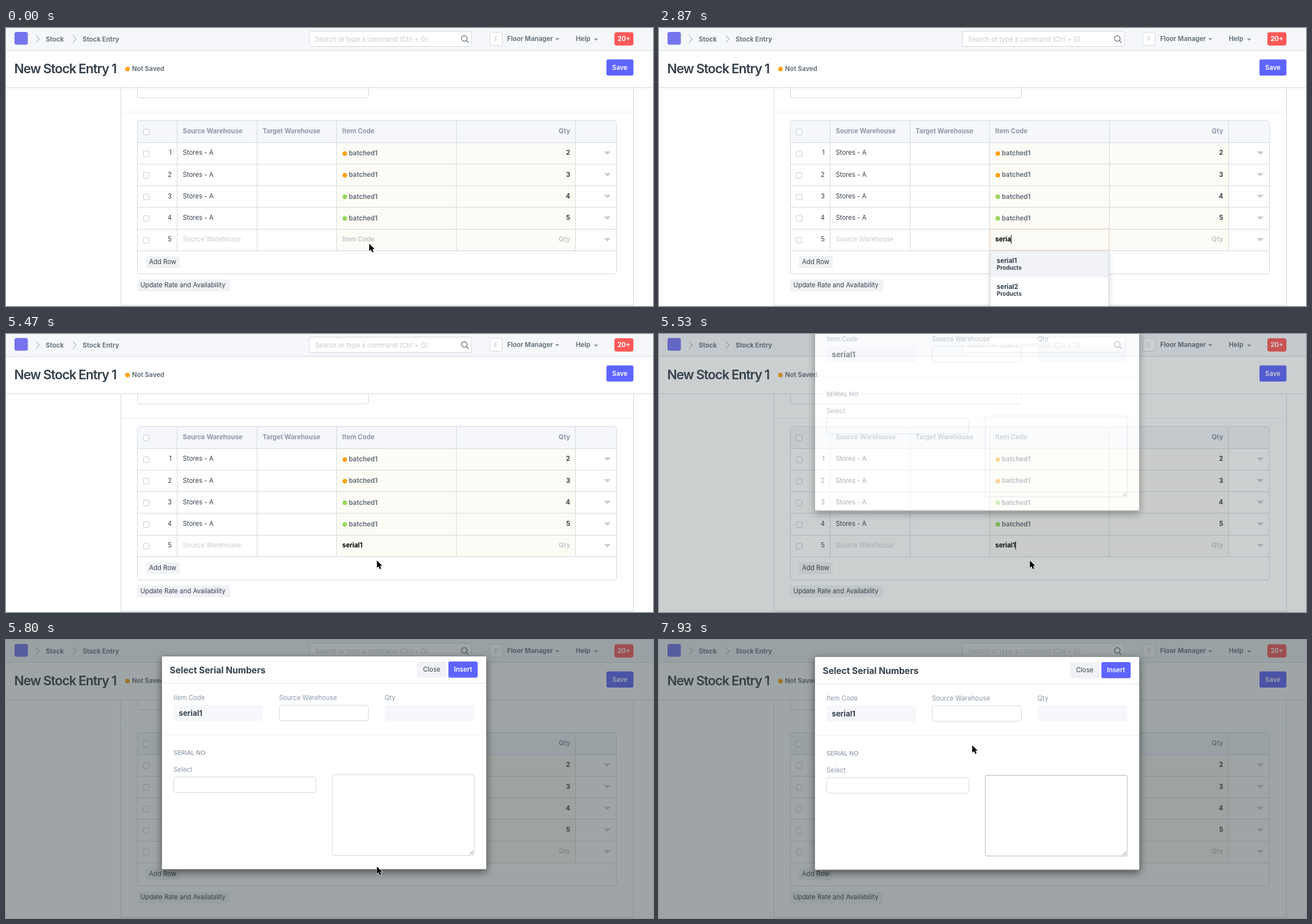
An HTML page for the animation above (8 s loop, 1140x491 px).

```html
<!DOCTYPE html>
<html lang="en">
<head>
<meta charset="utf-8">
<title>Stock entry</title>
<style>
  html, body { margin: 0; width: 100%; height: 100%; overflow: hidden; background: #fff; }
  svg { display: block; }
  text { font: 400 11.4px Inter, "Open Sans", sans-serif; font-optical-sizing: none; fill: #36414c; white-space: pre; }
  .b { font-weight: 700; }
  .m { font-weight: 600; }
  .end { text-anchor: end; }
  .mid { text-anchor: middle; }
  .grey { fill: #8d99a6; }
  .nav { fill: #6c7680; }
  .hint { fill: #c6cacf; }
  .white { fill: #fff; }
  .ink { fill: #000; }
  .small { font-size: 10px; }
  .h1 { font-size: 22.8px; font-weight: 600; letter-spacing: -1.06px; }
  .h4 { font-size: 15.6px; font-weight: 700; }
  .field { font-size: 13.3px; font-weight: 700; }
  .caps { font-size: 10.8px; font-weight: 500; }
  .drop { filter: drop-shadow(0 3px 4px rgba(0,0,0,.18)); }
  .lift { filter: drop-shadow(0 5px 7px rgba(0,0,0,.5)); }
</style>
</head>
<body>
<svg id="stage" width="1140" height="491" viewBox="0 0 1140 491"></svg>
<script>
const LOOP = 8000, STEP = 1000 / 15;
const LINE = '#d1d8dd', FAINT = '#ebeff2', PALE = '#f5f7fb', BUTTON = '#f0f2f6', BLUE = '#5e64ff';
const ORANGE = '#ffa00a', GREEN = '#98d85b';
const ROW = 38.2, TOP = 202.3;
const COLS = [301.5, 442.5, 582.5, 793.5, 1003.5];

const text = (x, y, s, cls = '', id = '') => `<text x="${x}" y="${y}" class="${cls}" id="${id}">${s}</text>`;
const box = (x, y, w, h, fill, stroke = 'none', r = 0, extra = '') =>
  `<rect x="${x}" y="${y}" width="${w}" height="${h}" rx="${r}" fill="${fill}" stroke="${stroke}" ${extra}/>`;
const path = (d, stroke, fill = 'none', w = 1, extra = '') =>
  `<path d="${d}" stroke="${stroke}" fill="${fill}" stroke-width="${w}" ${extra}/>`;
const dot = (x, y, fill) => `<circle cx="${x}" cy="${y}" r="4" fill="${fill}"/>`;
const caretDown = (x, y, w, h, fill) => path(`M${x} ${y}h${w}l${-w / 2} ${h}z`, 'none', fill);
const checkbox = y => box(242, y - 5, 10, 10, '#fff', '#c3c9cf', 1.5);

function gridRow(i) {
  const y = TOP + ROW * i, base = y + 22, last = i === 4;
  return (i === 3 ? box(232, y, 843, ROW, PALE, 'none', 0, 'id="hover"') : '')
    + box(582.5, y, 421, ROW, '#fcfbf5')
    + checkbox(y + 19.7)
    + text(292, base, i + 1, 'end')
    + (last
      ? text(311.5, base, 'Source Warehouse', 'hint') + text(994, base, 'Qty', 'b hint end')
      : text(311.5, base, 'Stores - A')
        + dot(597, y + 19.4, i < 2 ? ORANGE : GREEN)
        + text(604, base + .9, 'batched1', 'b nav')
        + text(994, base, i + 2, 'b end'))
    + caretDown(1053.5, y + 15.8, 12, 6, '#c9cccf');
}

function grid() {
  const bottom = TOP + ROW * 5;
  let lines = '';
  for (let i = 0; i < 6; i++) lines += `M232 ${Math.floor(TOP + ROW * i) + .5}H1075`;
  for (const x of COLS) lines += `M${x} 164V${bottom}`;
  return box(231.5, 163.5, 844, 271, '#fff', LINE, 4)
    + box(232, 164, 843, 38.5, PALE, 'none', 3.5)
    + checkbox(183.5)
    + text(311.5, 186.2, 'Source Warehouse', 'b grey')
    + text(452, 186.2, 'Target Warehouse', 'b grey')
    + text(592.5, 186.2, 'Item Code', 'b grey')
    + text(994, 186.2, 'Qty', 'b grey end')
    + [0, 1, 2, 3, 4].map(gridRow).join('')
    + path(lines, LINE)
    + box(247, 403, 59, 21, BUTTON, 'none', 2) + text(252, 417.4, 'Add Row');
}

const page = () =>
  path('M202.5 106V491M1105.5 106V491M202 489.5H1106', LINE)
  + path('M203 148.5H1105', FAINT)
  + box(231.5, 90, 407, 33.5, '#fff', LINE, 4)
  + grid()
  + box(231.5, 444, 163.5, 21, BUTTON, 'none', 2)
  + text(236.7, 458.4, 'Update Rate and Availability')
  + box(0, 40, 1140, 65, '#fff') + path('M0 105.5H1140', LINE)
  + text(14.5, 80.2, 'New Stock Entry 1', 'h1')
  + dot(214, 72.4, ORANGE) + text(222, 76.4, 'Not Saved', 'b nav')
  + box(1058, 55.5, 47.5, 28.5, BLUE, 'none', 3) + text(1081.5, 73.6, 'Save', 'm white mid');

const navbar = () =>
  box(0, 0, 1140, 39, PALE) + path('M0 39.5H1140', LINE)
  + box(15, 7, 23.5, 22.5, '#7574ee', 'none', 3.5)
  + path('M53 13l5.5 6.5-5.5 6.5M118 13l5.5 6.5-5.5 6.5', '#b8c0c8', 'none', 1.3)
  + text(70, 23.7, 'Stock', 'b nav') + text(135, 23.7, 'Stock Entry', 'b nav')
  + box(534.5, 5.5, 286, 27, '#fff', LINE, 2)
  + text(544.5, 23.7, 'Search or type a command (Ctrl + G)', 'hint')
  + path('M812.5 18.5a5 5 0 1 1-10 0a5 5 0 1 1 10 0M811 22l4.3 4.3', '#6c7680', 'none', 1.3)
  + box(852.5, 7.5, 22, 23, '#fff', LINE, 3) + text(863.5, 23.7, 'F', 'hint mid')
  + text(883, 23, 'Floor Manager', 'b nav') + caretDown(967.5, 18, 7.5, 4, '#8d99a6')
  + text(1004, 23, 'Help', 'b nav') + caretDown(1036, 18.5, 7.5, 4, '#8d99a6')
  + box(1072, 7.5, 33.5, 23.5, '#ff5858', 'none', 4) + text(1088.7, 23.3, '20+', 'b white mid');

const editor = () =>
  box(583, 354.7, 210, 38.3, 'none', '#fbd0c4', 0, 'id="focus"')
  + text(592.5, 377.3, '', 'b', 'entry')
  + path('M0 366V381', '#000', 'none', 1, 'id="caret"')
  + `<g id="menu"><g class="drop">${box(583.5, 393.5, 209, 150, '#fff', LINE)}</g>`
  + box(584, 394, 208, 46.5, BUTTON)
  + [0, 46].map((dy, i) => text(595, 415.4 + dy, '', 'b', 'item' + i)
    + text(595, 426.9 + dy, 'Products', 'b small')).join('')
  + '</g>';

const modal = () =>
  `<g class="lift">${box(274.5, 29.5, 572, 376.5, '#fff', '#8a9091', 2)}</g>`
  + text(288.5, 60.2, 'Select Serial Numbers', 'h4')
  + box(724, 39, 52, 28.5, BUTTON, 'none', 3) + text(750, 57.4, 'Close', 'mid')
  + box(779.5, 39, 51.5, 28.5, BLUE, 'none', 3) + text(805.3, 57.4, 'Insert', 'm white mid')
  + path('M275 77.5H846', '#dfe4e8') + path('M275 168.5H846', FAINT)
  + text(295, 107, 'Item Code', 'grey') + text(481, 107, 'Source Warehouse', 'grey') + text(667, 107, 'Qty', 'grey')
  + box(295, 116, 157.5, 28, PALE, 'none', 3) + text(304.5, 134.7, 'serial1', 'field')
  + box(481.5, 116, 157, 27.5, '#fff', LINE, 4)
  + box(667.5, 116, 157, 28, PALE, 'none', 3)
  + text(295, 203.8, 'SERIAL NO', 'caps grey') + text(295, 234, 'Select', 'grey')
  + box(295.5, 243, 250.5, 27.5, '#fff', LINE, 4)
  + box(575, 239, 250, 142.5, '#fff', LINE, 3, 'id="area"')
  + path('M816.5 380l7-7M820.5 380l3-3', '#777');

const ARROW = 'M0 0V13L3 10.3L5.2 15.2L7.6 14.2L5.4 9.4H9.5Z';
const HAND = 'M3.2 0.8C4.6 0.4 5 2 5 3V6C6 5 7.5 5.5 7.6 6.4C8.6 5.7 9.8 6.2 10 7.2C11.2 6.8 12 7.6 12 8.8V11.5C12 13.5 11 14.5 10.8 16.5H4.6C4.2 14 2 12.5 -0.6 9.6C-1 8.2 0.6 7.8 2.4 9.4V2.2Z';

document.getElementById('stage').innerHTML = page() + navbar() + editor()
  + path('', 'none', '#334143', 0, 'id="shade" fill-rule="evenodd"')
  + `<g id="modal">${modal()}</g>`
  + `<g id="pointer"><path id="arrow" d="${ARROW}" fill="#000" stroke="#fff" stroke-width="1.2" paint-order="stroke"/>`
  + `<g id="hand">${path(HAND, '#222', '#fff', 1.2)}${path('M6 11v3.5M8.2 11v3.5', '#222', 'none', .8)}</g></g>`;

const el = id => document.getElementById(id);
const show = (id, on) => el(id).setAttribute('visibility', on ? 'inherit' : 'hidden');
const set = (id, name, value) => el(id).setAttribute(name, value);
const clamp = v => Math.max(0, Math.min(1, v));

// Pointer stops: time, x, y
const TRAIL = [[0, 640, 381], [1870, 640, 381], [3330, 640, 345], [3800, 643.5, 389], [4470, 653.5, 400],
  [6000, 653.5, 400], [6530, 604, 286], [7400, 552, 186], [LOOP, 552, 186]];

function pointerAt(t) {
  const i = TRAIL.findIndex((stop, k) => k && t <= stop[0]);
  const [t0, x0, y0] = TRAIL[i - 1], [t1, x1, y1] = TRAIL[i];
  const u = (t - t0) / (t1 - t0), s = u * u * (3 - 2 * u);
  return [x0 + (x1 - x0) * s, y0 + (y1 - y0) * s];
}

// CSS ease-out: cubic-bezier(0, 0, .58, 1)
function easeOut(x) {
  let lo = 0, hi = 1;
  for (let i = 0; i < 20; i++) {
    const u = (lo + hi) / 2;
    if (3 * (1 - u) * u * u * .58 + u ** 3 < x) lo = u; else hi = u;
  }
  return 3 * (1 - lo) * lo * lo + lo ** 3;
}

const OPEN = 930, TYPE = 1860, KEY = 212, FILTER = 2470, PICK = 4530, POPUP = 83 * STEP;

function drawEntry(t) {
  const typed = t < TYPE ? 0 : Math.min(6, 1 + Math.floor((t - TYPE) / KEY));
  const value = t >= PICK ? 'serial1' : 'serial'.slice(0, typed);
  const editing = t >= OPEN && t < PICK;
  const entry = el('entry');
  entry.textContent = value || 'Item Code';
  entry.setAttribute('class', value ? 'b ink' : 'b hint');
  show('focus', editing);
  show('menu', editing);
  el('item0').textContent = t < FILTER ? 'batched1' : 'serial1';
  el('item1').textContent = t < FILTER ? 'serial1' : 'serial2';

  const lastKey = typed ? TYPE + (typed - 1) * KEY : OPEN;
  const blink = (t - lastKey) % 1000 < 500;
  show('caret', editing && blink || t >= POPUP - 1);
  const width = value ? entry.getComputedTextLength() : 0;
  set('caret', 'transform', `translate(${Math.round(592.5 + width) + .5} 0)`);
  show('hover', t >= 3330 && t < 4130);
}

function drawModal(t) {
  const since = t - POPUP + 1, open = since >= 0;
  const dy = Math.round(-94.4 * (1 - easeOut(clamp(since / 290))));
  // The shade leaves the dialog's own area clear while it fades in
  set('shade', 'd', `M0 0H1140V491H0ZM275 ${30 + dy}h571v376h-571z`);
  set('shade', 'opacity', open ? .47 * clamp(.53 + since / 130) : 0);
  set('modal', 'opacity', open ? clamp(.57 + since / 150) : 0);
  set('modal', 'transform', `translate(0 ${dy})`);
  const focused = t >= 6130;
  set('area', 'stroke', focused ? '#c3cad0' : LINE);
  set('area', 'stroke-width', focused ? 1.3 : 1);
}

function drawPointer(t) {
  const hand = t >= 3700 && t < PICK, visible = t < TYPE || t >= 3330;
  show('hand', visible && hand);
  show('arrow', visible && !hand);
  set('pointer', 'transform', `translate(${pointerAt(t)})`);
}

const start = performance.now();
function tick() {
  const elapsed = (performance.now() - start) % LOOP;
  const t = Math.min(119, Math.floor((elapsed + 4) / STEP)) * STEP;
  drawEntry(t);
  drawModal(t);
  drawPointer(t);
  requestAnimationFrame(tick);
}
tick();
</script>
</body>
</html>
```
